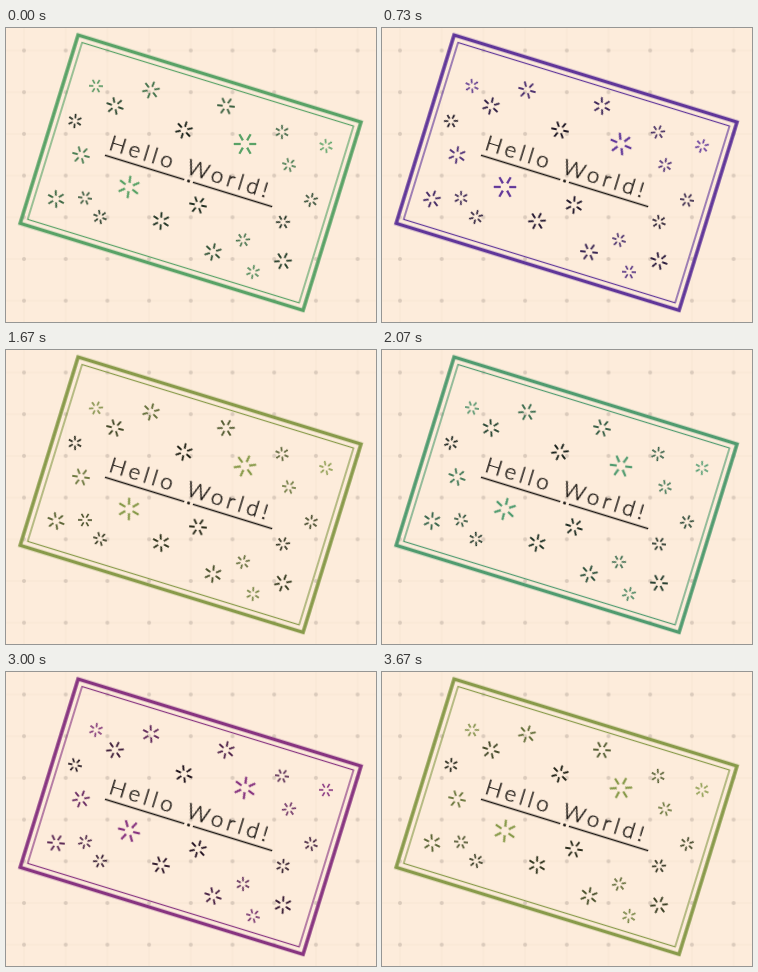
Write an HTML page that moves like this. It is 370 by 294 pixels and loops after 3740 ms.

```html
<!DOCTYPE html>
<html lang="en">
<head>
<meta charset="utf-8">
<title>Hello World</title>
<style>
  @property --t { syntax: "<angle>"; inherits: true; initial-value: 0deg; }

  html, body { margin: 0; width: 100%; height: 100%; overflow: hidden; background: #fdecdb; }
  svg { display: block; width: 370px; height: 294px; animation: tint 3740ms linear infinite; }

  /* Cosine palette: one colour cycle every two seconds */
  .tint {
    --lum: 1;
    fill: none;
    stroke: rgb(
      calc(var(--lum) * (112 + 48 * cos(var(--t) - 241deg)))
      calc(var(--lum) * (107 + 59 * cos(var(--t) - 338deg)))
      calc(var(--lum) * (115 + 42 * cos(var(--t) - 108deg))));
  }
  .ink { stroke: #17130f; stroke-width: 1.3; }
  text {
    font: 300 22px Lato, "Open Sans", sans-serif;
    letter-spacing: 4px;
    word-spacing: 2px;
    fill: #17130f;
    stroke: #17130f;
    stroke-width: .4;
  }
  .star { animation: spin 1870ms linear infinite; }

  @keyframes tint { to { --t: 673.2deg; } }
  @keyframes spin { to { transform: rotate(60deg); } }
</style>
</head>
<body>
<svg viewBox="0 0 370 294">
  <defs>
    <pattern id="grid" x="-2.85" y="1.65" width="41.7" height="41.7" patternUnits="userSpaceOnUse">
      <path d="M20.85 0V41.7M0 20.85H41.7" stroke="#f7e5d3"/>
      <circle cx="20.85" cy="20.85" r="2" fill="#dacabb"/>
    </pattern>
  </defs>
  <rect width="370" height="294" fill="#fdecdb"/>
  <rect width="370" height="294" fill="url(#grid)"/>
  <g id="stars"></g>
  <g transform="translate(184.6 144.7) rotate(17.1)">
    <rect class="tint" x="-148" y="-98.5" width="296" height="197" stroke-width="3.5"/>
    <rect class="tint" x="-142" y="-92.5" width="284" height="185" stroke-width="1.2"/>
    <text x="-86" y="2">Hello World!</text>
    <path class="ink" d="M-87 8.5H-4M5 8.5H88"/>
    <circle cx=".5" cy="8.5" r="1.5" fill="#17130f"/>
  </g>
</svg>
<script>
  // Each group runs evenly from its brightest star to its darkest
  const groups = [
    { r: 12.5, lum: [1, 1], at: [[239, 116], [123, 159]] },
    { r: 9.8, lum: [.75, .15], at: [
      [75, 127], [145, 62], [50, 171], [220, 78], [207, 224],
      [109, 78], [277, 233], [155, 193], [192, 177], [178, 102]] },
    { r: 7.8, lum: [1, .15], at: [
      [320, 118], [90, 58], [247, 244], [283, 137], [237, 212], [276, 104],
      [79, 170], [305, 172], [94, 189], [277, 194], [69, 93]] }
  ];

  let count = 0;

  function star([x, y], r, lum) {
    const delay = -1870 * (count++ * .618 % 1);
    let arms = "";
    for (let turn = 0; turn < 360; turn += 60) {
      arms += `<path d="M${r * .34} 0H${r * .9}" transform="rotate(${turn})"/>`;
    }
    return `<g transform="translate(${x} ${y})">
      <g class="star tint" stroke-width="${r * .14 + .5}"
        style="--lum:${lum};animation-delay:${delay}ms">${arms}</g></g>`;
  }

  document.getElementById("stars").innerHTML = groups.map(({ r, lum: [from, to], at }) =>
    at.map((p, i) => star(p, r, from + (to - from) * i / (at.length - 1))).join("")
  ).join("");
</script>
</body>
</html>
```
